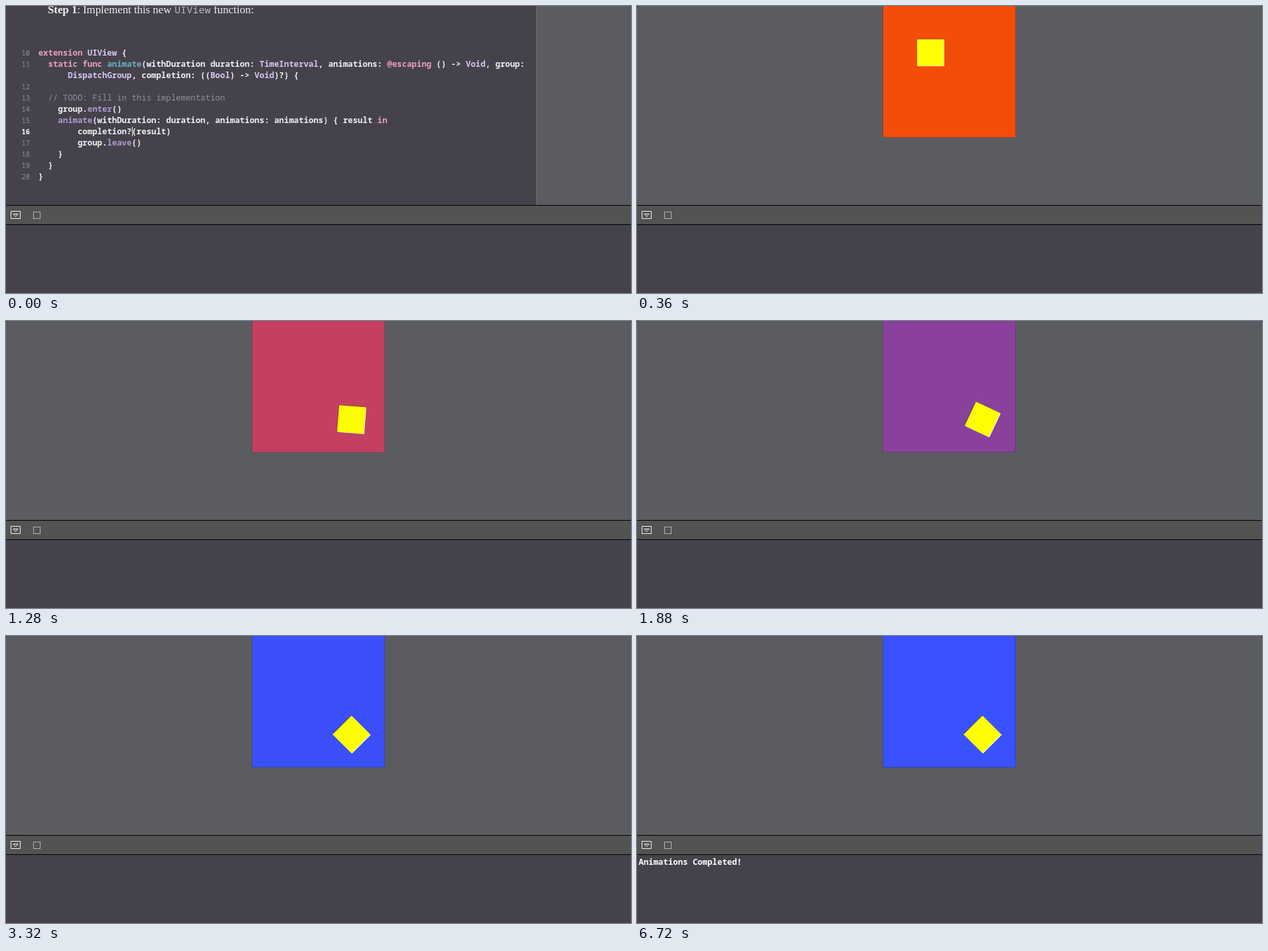
Recreate the animation shown at these times as an HTML page. Size 942 by 434 pixels, loop 6.76 s.

```html
<!DOCTYPE html>
<html lang="en">
<head>
<meta charset="utf-8">
<title>Animation group</title>
<style>
  html, body { margin: 0; width: 100%; height: 100%; overflow: hidden; background: #2c2c2f; }
  svg { display: block; border-radius: 3px; }
  text { white-space: pre; }
  .code { font: 600 12.35px "Noto Sans Mono", "DejaVu Sans Mono", monospace; fill: #f1f0f3; }
  .number { font: 500 10.4px "Noto Sans Mono", "DejaVu Sans Mono", monospace; fill: #8f8d94; text-anchor: end; }
  .number.current { fill: #fff; font-weight: 700; }
  .title { font: 16.8px "Liberation Serif", "Noto Serif", serif; fill: #f0eff2; }
  .mono { font: 15.2px "Noto Sans Mono", monospace; fill: #b9b7be; }
  .keyword { fill: #ec9fbf; }
  .type { fill: #d5c8f8; }
  .name { fill: #6cb0c6; }
  .call { fill: #ab9ad0; }
  .comment { fill: #918f95; font-weight: 500; }
</style>
</head>
<body>
<svg width="942" height="434" viewBox="0 0 942 434">
  <rect width="942" height="434" fill="#5b5c60"/>

  <g id="editor">
    <rect width="799" height="301" fill="#45424b"/>
    <rect x="799" width="1" height="301" fill="#6d6e72"/>
    <text class="title" x="63" y="11"><tspan font-weight="700">Step 1</tspan>:</text>
    <text class="title" x="116" y="11">Implement this new</text>
    <text class="mono" x="254" y="11">UIView</text>
    <text class="title" x="313" y="11">function:</text>
    <g id="listing"></g>
    <rect x="190" y="183" width="1" height="14" fill="#fff"/>
  </g>

  <g id="preview">
    <rect id="view" x="371" y="-2" width="200" height="201"/>
    <path id="edge" d="M370.5 0V198.5H570.5V0" fill="none" stroke="#30303c" stroke-opacity=".35"/>
    <g id="boxShade" fill="#3c2c2c" fill-opacity=".65"><rect x="-20" y="-20" width="40" height="40"/></g>
    <g id="boxLight" fill="#ffffc4"><rect x="-20" y="-20" width="40" height="40"/></g>
    <g id="boxFace" fill="#ffff00"><rect x="-20" y="-20" width="40" height="40"/></g>
  </g>

  <rect y="301" width="942" height="133" fill="#45424b"/>
  <rect y="301" width="942" height="30" fill="#000"/>
  <rect y="302" width="942" height="28" fill="#535353"/>
  <g fill="none">
    <path d="M7.5 310.5h14v11h-14zM11 314.5h7l-3.5 4z" stroke="#f2f2f2"/>
    <rect x="41.5" y="311.5" width="10" height="10" stroke="#b4b4b4"/>
  </g>
  <text id="message" class="code" x="2.5" y="346" style="font-weight:700;fill:#fff">Animations Completed!</text>
</svg>

<script>
const LOOP = 6760;
const $ = id => document.getElementById(id);

// Each row: line number, indent in characters, text with [class|words] marks.
const listing = [
  [10, 0, '[keyword|extension] [type|UIView] {'],
  [11, 2, '[keyword|static func] [name|animate](withDuration duration: [type|TimeInterval], animations: [keyword|@escaping] () -> [type|Void], group:'],
  ['', 6, '[type|DispatchGroup], completion: (([type|Bool]) -> [type|Void])?) {'],
  [12, 0, ''],
  [13, 2, '[comment|// TODO: Fill in this implementation]'],
  [14, 4, 'group.[call|enter]()'],
  [15, 4, '[call|animate](withDuration: duration, animations: animations) { result [keyword|in]'],
  [16, 8, 'completion?(result)'],
  [17, 8, 'group.[call|leave]()'],
  [18, 4, '}'],
  [19, 2, '}'],
  [20, 0, '}']
];

$('listing').innerHTML = listing.map(([number, indent, source], row) => {
  const y = 75 + row * 17;
  const code = source.replace(/>/g, '&gt;')
    .replace(/\[(\w+)\|([^\]]+)\]/g, '<tspan class="$1">$2</tspan>');
  return `<text class="number${number === 16 ? ' current' : ''}" x="36" y="${y}">${number}</text>` +
    `<text class="code" x="${48.7 + indent * 7.41}" y="${y}">${code}</text>`;
}).join('');

const mix = (a, b, k) => a + (b - a) * k;

// Ease-in-out, the curve cubic-bezier(.42, 0, .58, 1).
function ease(x) {
  if (x <= 0) return 0;
  if (x >= 1) return 1;
  let low = 0, high = 1;
  for (let i = 0; i < 24; i++) {
    const s = (low + high) / 2, r = 1 - s;
    if (3 * r * r * s * .42 + 3 * r * s * s * .58 + s ** 3 < x) low = s; else high = s;
  }
  return low * low * (3 - 2 * low);
}

const progress = (time, start, duration) => ease((time - start) / duration);

const colorStops = [
  [0, 244, 77, 0],
  [.045, 243, 77, 20],
  [.255, 196, 64, 95],
  [.758, 84, 66, 210],
  [1, 57, 81, 255]
];

function viewColor(p) {
  const i = Math.max(1, colorStops.findIndex(stop => stop[0] >= p));
  const from = colorStops[i - 1], to = colorStops[i];
  const k = (p - from[0]) / (to[0] - from[0]);
  return `rgb(${[1, 2, 3].map(c => Math.round(mix(from[c], to[c], k))).join(',')})`;
}

const show = (id, visible) => $(id).setAttribute('visibility', visible ? 'visible' : 'hidden');

function draw(time) {
  const editing = time < 40;
  show('editor', editing);
  show('preview', !editing);
  show('message', time >= 3720);

  $('view').setAttribute('fill', viewColor(progress(time, -40, 3760)));

  const offset = mix(20, 150, progress(time, -40, 912));
  const angle = 45 * progress(time, 860, 1910);
  const place = (id, dx, dy) => $(id).setAttribute('transform',
    `translate(${371 + offset + dx} ${offset - 1 + dy}) rotate(${angle})`);
  place('boxShade', -1, -1);
  place('boxLight', .5, .5);
  place('boxFace', -.5, -.3);
}

function tick() {
  draw(performance.now() % LOOP);
  requestAnimationFrame(tick);
}
tick();
</script>
</body>
</html>
```
